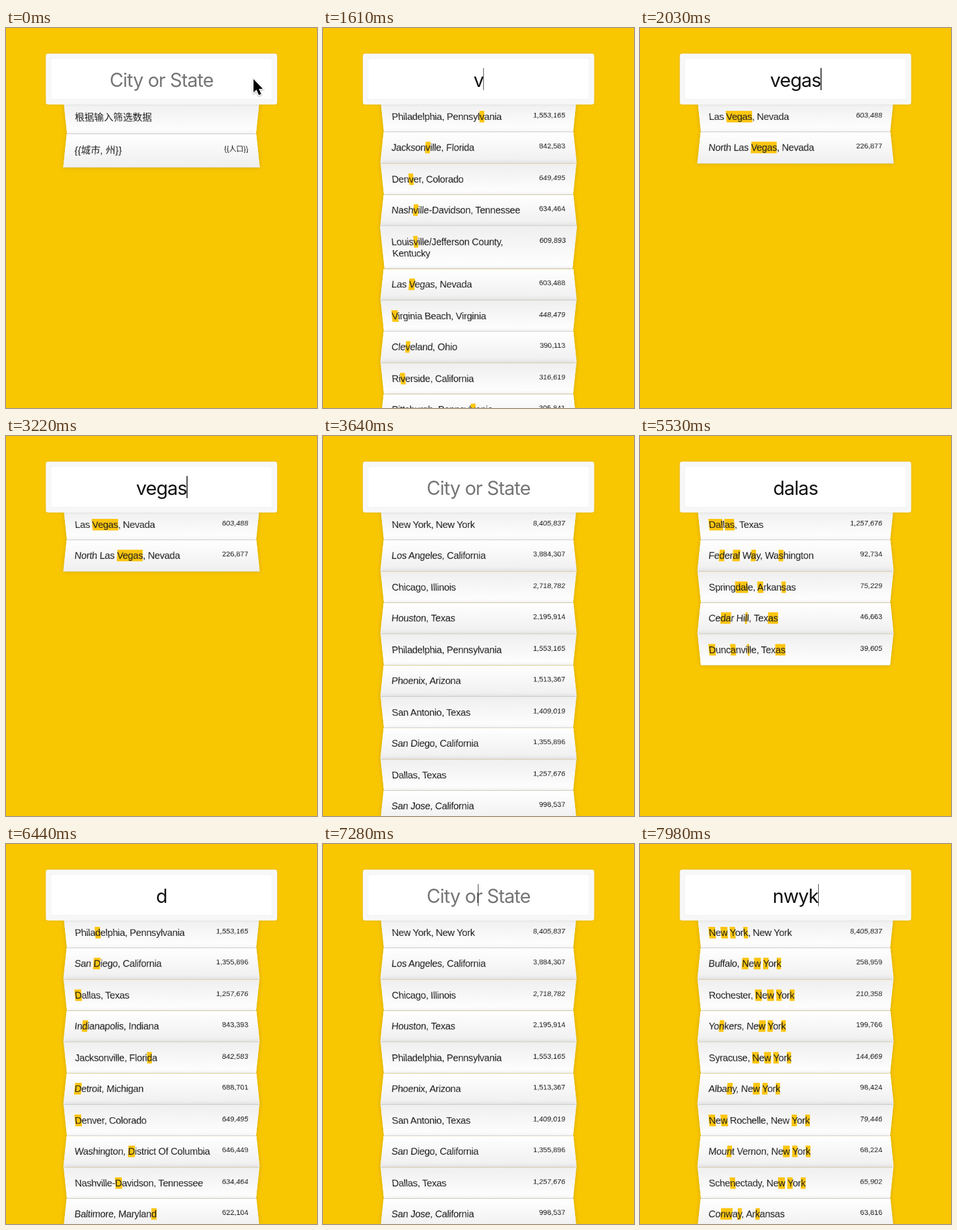
An HTML page that plays this animation: 480 by 587 pixels, repeating every 8 s.

```html
<!DOCTYPE html>
<html lang="en">
<head>
<meta charset="utf-8">
<title>Type ahead</title>
<style>
  html, body { margin: 0; width: 100%; height: 100%; overflow: hidden; background: #f9c702; }
  body { position: relative; font: 20px/24px "Liberation Sans", "Noto Sans CJK SC", "Noto Sans CJK", sans-serif; color: #1c1c1c; }
  .app { position: absolute; left: 39.5px; top: 31.5px; width: 400px; transform: scale(.744); transform-origin: 50% 0; }
  .search {
    position: relative; z-index: 2; top: 10px; left: -40px;
    box-sizing: border-box; width: 480px; height: 106px; padding: 20px;
    border: 10px solid #f7f7f7; border-radius: 5px; background: #fff;
    box-shadow: 0 0 5px rgba(0,0,0,.12), inset 0 0 2px rgba(0,0,0,.19);
    font: 39.4px/46px Inter, sans-serif; letter-spacing: -.031em; text-align: center; color: #111;
  }
  .query { position: relative; top: 1.5px; }
  .query.empty { color: #757575; }
  .caret { position: absolute; right: -1px; top: 50%; width: 1.4px; height: 46px; margin-top: -25px; background: #111; }
  .empty .caret { right: 50%; }
  ul { position: relative; margin: 0; padding: 0; }
  li {
    display: flex; justify-content: space-between; padding: 20px; list-style: none;
    border-bottom: 1px solid #d8d8d8; box-shadow: 0 0 10px rgba(0,0,0,.14);
  }
  li:nth-child(odd) {
    transform: perspective(100px) rotateX(-3deg) translateY(3px);
    background: linear-gradient(to top, #fff, #efefef);
  }
  li:nth-child(even) {
    transform: perspective(100px) rotateX(3deg) translateY(2px) scale(1.001);
    background: linear-gradient(to bottom, #fff, #efefef);
  }
  .name { letter-spacing: -.43px; }
  .pop { font-size: 15px; line-height: 18px; }
  .hint { line-height: 28px; font-weight: 300; }
  .hint .name { letter-spacing: 0; }
  .hint .pop { line-height: 21px; }
  .hl { background: #fbc511; padding: .7px 0; }
  .mouse { position: absolute; left: 378px; top: 76px; z-index: 3; filter: drop-shadow(0 1px 1px rgba(0,0,0,.35)); }
</style>
</head>
<body>
<div class="app">
  <div class="search"><span class="query" id="query"><span id="text"></span><i class="caret" id="caret"></i></span></div>
  <ul id="list"></ul>
</div>
<svg class="mouse" id="mouse" width="24" height="34" viewBox="-4 -3 24 34">
  <path d="M0 0V20.5L4.6 16.3L8.2 24.6L11.8 23L8.3 14.9H14.4Z" stroke="#fff" stroke-width="2.4" paint-order="stroke"/>
</svg>
<script>
const LOOP = 8000, BLINK = 530;

const cities = `New York, New York 8405837
Los Angeles, California 3884307
Chicago, Illinois 2718782
Houston, Texas 2195914
Philadelphia, Pennsylvania 1553165
Phoenix, Arizona 1513367
San Antonio, Texas 1409019
San Diego, California 1355896
Dallas, Texas 1257676
San Jose, California 998537
Austin, Texas 885400
Indianapolis, Indiana 843393
Jacksonville, Florida 842583
San Francisco, California 837442
Columbus, Ohio 822553
Detroit, Michigan 688701
Denver, Colorado 649495
Washington, District Of Columbia 646449
Nashville-Davidson, Tennessee 634464
Baltimore, Maryland 622104
Louisville/Jefferson County, Kentucky 609893
Portland, Oregon 609456
Las Vegas, Nevada 603488
Albuquerque, New Mexico 556495
Virginia Beach, Virginia 448479
Colorado Springs, Colorado 439886
Oakland, California 406253
Cleveland, Ohio 390113
New Orleans, Louisiana 378715
Bakersfield, California 363630
Riverside, California 316619
Pittsburgh, Pennsylvania 305841
Newark, New Jersey 278427
Buffalo, New York 258959
Jersey City, New Jersey 257342
Madison, Wisconsin 243344
Glendale, Arizona 234632
North Las Vegas, Nevada 226877
San Bernardino, California 213708
Spokane, Washington 210721
Rochester, New York 210358
Des Moines, Iowa 207510
Modesto, California 204933
Fayetteville, North Carolina 204408
Moreno Valley, California 201175
Yonkers, New York 199766
Fort Lauderdale, Florida 172389
Vancouver, Washington 167405
Paterson, New Jersey 145948
Syracuse, New York 144669
Savannah, Georgia 142772
Elizabeth, New Jersey 127558
Everett, Washington 105370
Albany, New York 98424
Beaverton, Oregon 93542
Federal Way, Washington 92734
Spokane Valley, Washington 91113
New Rochelle, New York 79446
Springdale, Arkansas 75229
Mount Vernon, New York 68224
Schenectady, New York 65902
Conway, Arkansas 63816
Valdosta, Georgia 56481
Roseville, Michigan 47555
Cedar Hill, Texas 46663
Cleveland Heights, Ohio 45394
Charlottesville, Virginia 44349
Danville, Virginia 42907
Duncanville, Texas 39605`.split('\n').map(line => {
  const cut = line.lastIndexOf(' ');
  return { name: line.slice(0, cut), pop: (+line.slice(cut)).toLocaleString('en-US') };
});

// Steady runs of key presses; null means the field is still untouched.
const keys = [[0, null]];
const type = (start, gap, word) => {
  for (let i = 1; i <= word.length; i++) keys.push([start + (i - 1) * gap, word.slice(0, i)]);
};
const erase = (start, gap, word) => {
  for (let i = 1; i <= word.length; i++) keys.push([start + (i - 1) * gap, word.slice(0, -i)]);
};
type(1510, 115, 'vegas');
erase(3340, 72, 'vegas');
type(4300, 120, 'dalas');
erase(6200, 72, 'dalas');
type(7380, 125, 'nwyk');

const $ = id => document.getElementById(id);
const row = (name, pop, cls = '') =>
  `<li class="${cls}"><span class="name">${name}</span><span class="pop">${pop}</span></li>`;

// Marks the letters of the query in order; null when some are missing.
function mark(name, query) {
  let i = 0, out = '';
  for (const c of name) {
    const hit = i < query.length && c.toLowerCase() === query[i];
    if (hit) i++;
    out += hit ? `<span class="hl">${c}</span>` : c;
  }
  return i === query.length ? out : null;
}

function rows(query) {
  if (query === null) return row('根据输入筛选数据', '', 'hint') + row('{{城市, 州}}', '{{人口}}', 'hint');
  return cities
    .map(c => ({ html: mark(c.name, query), pop: c.pop }))
    .filter(c => c.html !== null)
    .slice(0, 11)
    .map(c => row(c.html, c.pop))
    .join('');
}

let shown = -1;
function render(t) {
  let k = keys.length - 1;
  while (keys[k][0] > t) k--;
  const [start, query] = keys[k];
  if (k !== shown) {
    shown = k;
    $('text').textContent = query || 'City or State';
    $('query').classList.toggle('empty', !query);
    $('list').innerHTML = rows(query);
    $('mouse').style.display = query === null ? '' : 'none';
  }
  // The caret is solid after typing and hidden first after deleting.
  const deleted = k > 0 && query.length < (keys[k - 1][1] || '').length;
  const phase = Math.floor((t - start) / BLINK) + (deleted || query === null ? 1 : 0);
  $('caret').style.display = phase % 2 ? 'none' : '';
}

const begin = performance.now();
function tick() {
  render((performance.now() - begin) % LOOP);
  requestAnimationFrame(tick);
}
tick();
</script>
</body>
</html>
```
